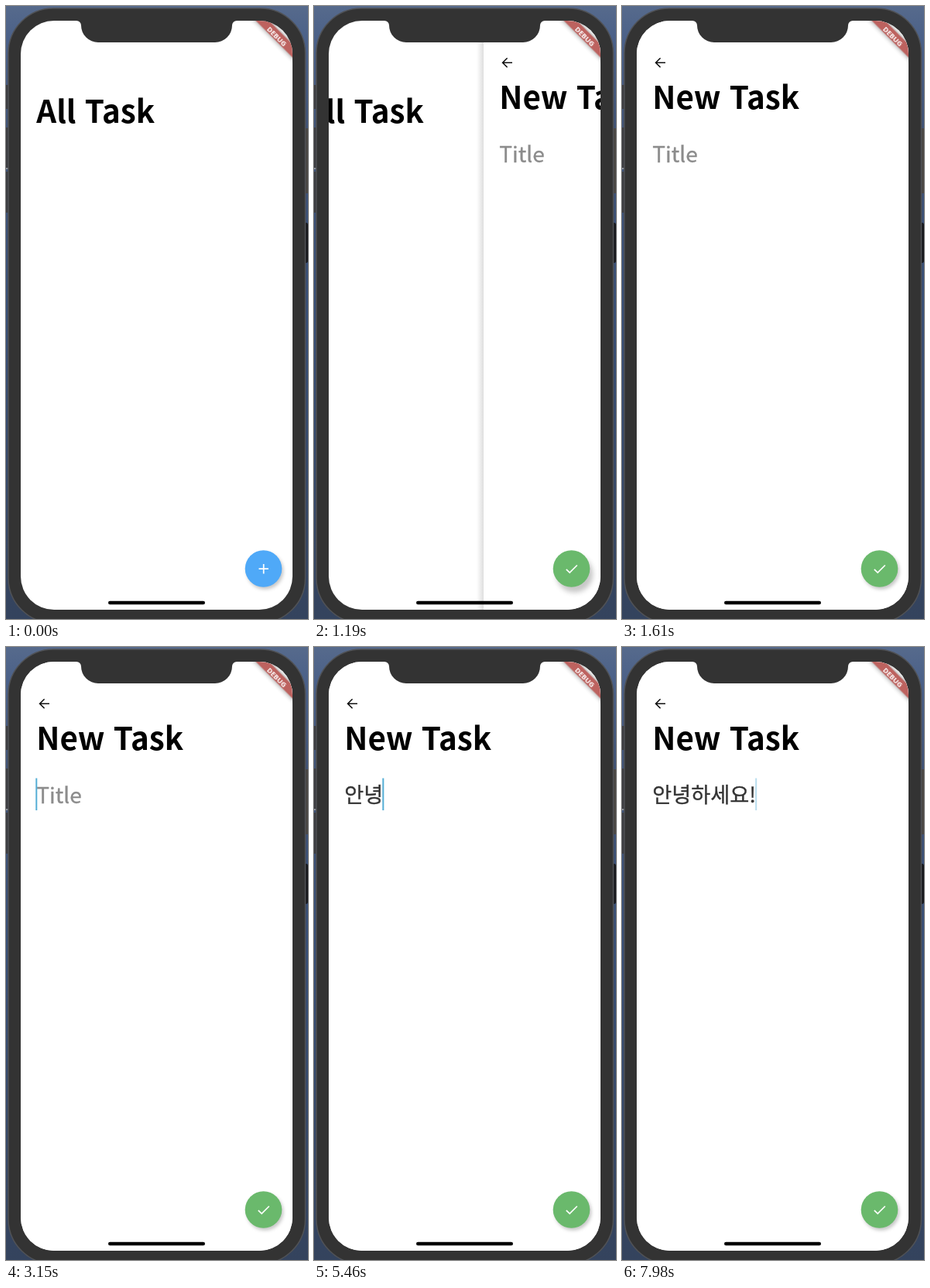
An HTML page that plays this animation: 390x792 px, repeating every 8 s.

```html
<!DOCTYPE html>
<html lang="ko">
<head>
<meta charset="utf-8">
<style>
  html, body { margin: 0; width: 100%; height: 100%; overflow: hidden; background: #3a4c6c; }
  svg { display: block; }
  text { font-family: "Noto Sans CJK KR", "Noto Sans CJK", sans-serif; white-space: pre; }
  .heading { font-size: 40.3px; font-weight: 700; }
  .field { font-size: 27.2px; fill: #333; stroke: #333; stroke-width: .35; }
  #hint { font-size: 28px; fill: #8c8c8c; stroke: #8c8c8c; }
  .icon { fill: none; stroke: #fff; stroke-width: 1.7; }
  #banner { filter: drop-shadow(0 0 3px rgba(0, 0, 0, .45)); }
  #banner text { font: 900 9.2px "Noto Sans", sans-serif; fill: #fff; }
</style>
</head>
<body>
<svg width="390" height="792" viewBox="0 0 390 792">
  <defs>
    <linearGradient id="sea" x2="0" y2="1">
      <stop offset="0" stop-color="#566a8c"/>
      <stop offset=".06" stop-color="#4a6088"/>
      <stop offset=".2" stop-color="#3f5275"/>
      <stop offset=".5" stop-color="#374e76"/>
      <stop offset="1" stop-color="#34435d"/>
    </linearGradient>
    <linearGradient id="edge">
      <stop offset="0" stop-color="#000" stop-opacity="0"/>
      <stop offset="1" stop-color="#000" stop-opacity=".13"/>
    </linearGradient>
    <clipPath id="screen"><rect x="19" y="19" width="351" height="761" rx="43"/></clipPath>
  </defs>

  <!-- desktop and side buttons -->
  <rect width="390" height="792" fill="url(#sea)"/>
  <g fill="#3b3c40">
    <rect y="102" width="6" height="31"/>
    <rect y="157" width="6" height="53"/>
    <rect y="214" width="6" height="53"/>
    <rect y="209" width="3" height="2" fill="#8a8f98"/>
    <rect x="384" y="158" width="6" height="84" fill="#4a4744"/>
    <rect x="385" y="280" width="5" height="52" rx="3" fill="#17181c"/>
  </g>

  <!-- phone -->
  <rect x="3" y="3" width="383.5" height="794" rx="58" fill="#333" stroke="#505256" stroke-width="1.5"/>

  <g clip-path="url(#screen)">
    <rect x="19" y="19" width="351" height="761" fill="#fff"/>
    <g id="list"><text class="heading" x="39.3" y="151.2">All Task</text></g>

    <g id="editor">
      <rect x="10" y="19" width="9" height="761" fill="url(#edge)"/>
      <rect x="19" y="19" width="351" height="761" fill="#fff"/>
      <path d="M49.6 67.2l-6 6 6 6M43.8 73.2H56" class="icon" style="stroke:#111;stroke-width:1.6"/>
      <text class="heading" x="39.3" y="133.2">New Task</text>
      <text class="field" id="hint" x="39.3" y="202">Title</text>
      <text class="field" id="typed" x="39.3" y="201.3"></text>
      <rect id="cursor" x="38.3" y="169.5" width="2" height="41.5" fill="#55aed6"/>
    </g>

    <g id="fab">
      <circle id="disc" cx="332.5" cy="727" r="23.8"/>
      <path id="plus" class="icon" d="M326.5 727.2h12.4M332.7 721v12.4"/>
      <path id="check" class="icon" d="M325.8 727.8l4.4 4.3 9.6-9.6"/>
    </g>

    <g id="banner" transform="translate(370 19) rotate(45)">
      <rect x="-60" y="21.5" width="120" height="12" fill="#bd625f"/>
      <text y="32.4" text-anchor="middle">DEBUG</text>
    </g>
  </g>

  <!-- notch and home bar -->
  <path d="M91 18V19A6 6 0 0 1 97 25A22 22 0 0 0 119 47H270A22 22 0 0 0 292 25A6 6 0 0 1 298 19V18Z" fill="#333"/>
  <rect x="132" y="768.8" width="125" height="4.4" rx="2.2"/>
</svg>

<script>
const LOOP = 8000, WIDTH = 351;
const PUSH = 1150.6, PUSH_TIME = 308;
const FOCUS = 2515, HALF_BLINK = 640, FADE = 240;

// Each keystroke recomposes the current syllable.
const keys = [
  [4480, "ㅇ"], [4685, "아"], [4825, "안"],
  [5180, "안ㄴ"], [5320, "안녀"], [5460, "안녕"],
  [5600, "안녕ㅎ"], [5740, "안녕하"],
  [6020, "안녕핫"], [6230, "안녕하세"],
  [6370, "안녕하셍"], [6510, "안녕하세요"], [7200, "안녕하세요!"]
];

const [list, editor, hint, typed, cursor, disc, plus, check] =
  ["list", "editor", "hint", "typed", "cursor", "disc", "plus", "check"]
    .map(id => document.getElementById(id));

const ramp = (t, start, length) => Math.min(1, Math.max(0, (t - start) / length));
const slide = (el, x) => el.setAttribute("transform", `translate(${x})`);
const show = (el, amount) => el.setAttribute("opacity", +amount);

function blink(t, since) {
  if (t < FOCUS) return 0;
  const age = t - since;
  const half = Math.floor(age / HALF_BLINK);
  if (half === 0) return 1;
  const fade = Math.min(1, (age % HALF_BLINK) / FADE);
  return half % 2 ? 1 - fade : fade;
}

function draw(t) {
  const left = (1 - ramp(t, PUSH, PUSH_TIME)) ** 4;
  const pushed = t >= PUSH;
  slide(editor, WIDTH * left);
  slide(list, -WIDTH * (1 - left) / 3);
  show(editor, pushed);

  const lift = ramp(t, 1000, 150) - ramp(t, 1400, 220);
  disc.setAttribute("fill", pushed ? "#6ab96c" : "#4fa9f8");
  disc.style.filter =
    `drop-shadow(${2 + 2 * lift}px ${3 + 4 * lift}px ${2 + lift}px rgba(0,0,0,.22))`;
  show(plus, !pushed);
  show(check, pushed);

  const [since, text] = keys.filter(k => k[0] <= t).pop() || [FOCUS, ""];
  if (typed.textContent !== text) typed.textContent = text;
  show(hint, 1 - ramp(t, keys[0][0], 220));
  slide(cursor, text ? typed.getComputedTextLength() : 0);
  show(cursor, blink(t, since));
}

const begin = performance.now();
function tick() {
  draw((performance.now() - begin) % LOOP);
  requestAnimationFrame(tick);
}
tick();
</script>
</body>
</html>
```
